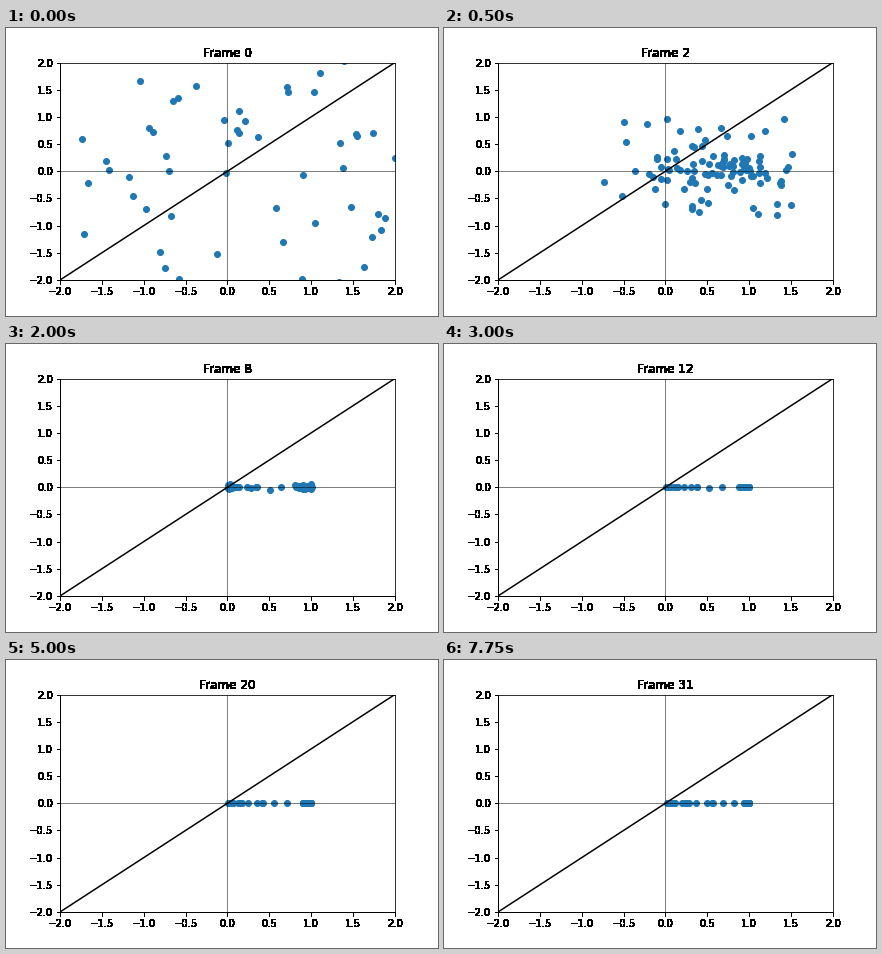
Recreate the animation shown at these times as a matplotlib script. Size 432 by 288 pixels, loop 8000 ms.

```python
import matplotlib.pyplot as plt
import numpy as np
from matplotlib.animation import FuncAnimation

FRAMES = 32
COUNT = 100
REACH = 2.7  # half width of the starting square

plt.rcParams.update({"font.family": "DejaVu Sans", "font.size": 10})
rng = np.random.default_rng(4)

# Points start spread out and are drawn to resting places on the x axis
start = rng.uniform(-REACH, REACH, (COUNT, 2))
decay = rng.uniform(0.2, 0.65, (COUNT, 1))

# Resting places: one group near 0, one near 1 and a few between
between = [0.105, 0.125, 0.14, 0.155, 0.21, 0.31, 0.37, 0.38, 0.51, 0.68]
near_zero = np.linspace(0.010, 0.054, 24)
near_one = np.linspace(0.885, 0.998, COUNT - len(near_zero) - len(between))
rest = rng.permutation(np.concatenate([near_zero, between, near_one]))
logit = np.log(rest / (1 - rest))


def resting_places(n):
    """Logistic creep towards x = 1."""
    clock = np.interp(n, [0, 12, 20, 31], [-0.5, 0, 0.18, 0.77])
    x = 1 / (1 + np.exp(-logit - clock))
    return np.column_stack([x, np.zeros(COUNT)])


def positions(n):
    return resting_places(n) + (start - resting_places(0)) * decay ** n


def solid(image, dpi):
    """Make every touched pixel fully black, for hard-edged lettering."""
    image[..., :3] = 0
    image[..., 3] = image[..., 3] > 0
    return image, 0, 0


fig = plt.figure(figsize=(6, 4), dpi=72, facecolor="white")
ax = fig.add_axes([0.125, 0.125, 0.775, 0.755])
ticks = np.arange(-2, 2.1, 0.5)
ax.set(xlim=(-2, 2), ylim=(-2, 2), xticks=ticks, yticks=ticks)
ax.spines[["left", "bottom"]].set_linewidth(1)

ax.plot([-2, 2], [-2, 2], color="black", lw=1.5)
ax.axhline(0, color="black", lw=0.5)
ax.axvline(0, color="black", lw=0.5)
dots = ax.scatter(*start.T, color="C0")
title = ax.set_title("Frame 0", fontsize=12)

for axis in (ax.xaxis, ax.yaxis):
    for part in [*axis.get_ticklabels(), *axis.get_ticklines()]:
        part.set_agg_filter(solid)
title.set_agg_filter(solid)


def update(n):
    dots.set_offsets(positions(n))
    title.set_text(f"Frame {n}")
    return dots, title


anim = FuncAnimation(fig, update, frames=FRAMES, interval=250,
                     repeat=True, repeat_delay=0, blit=False)
plt.show()
```
